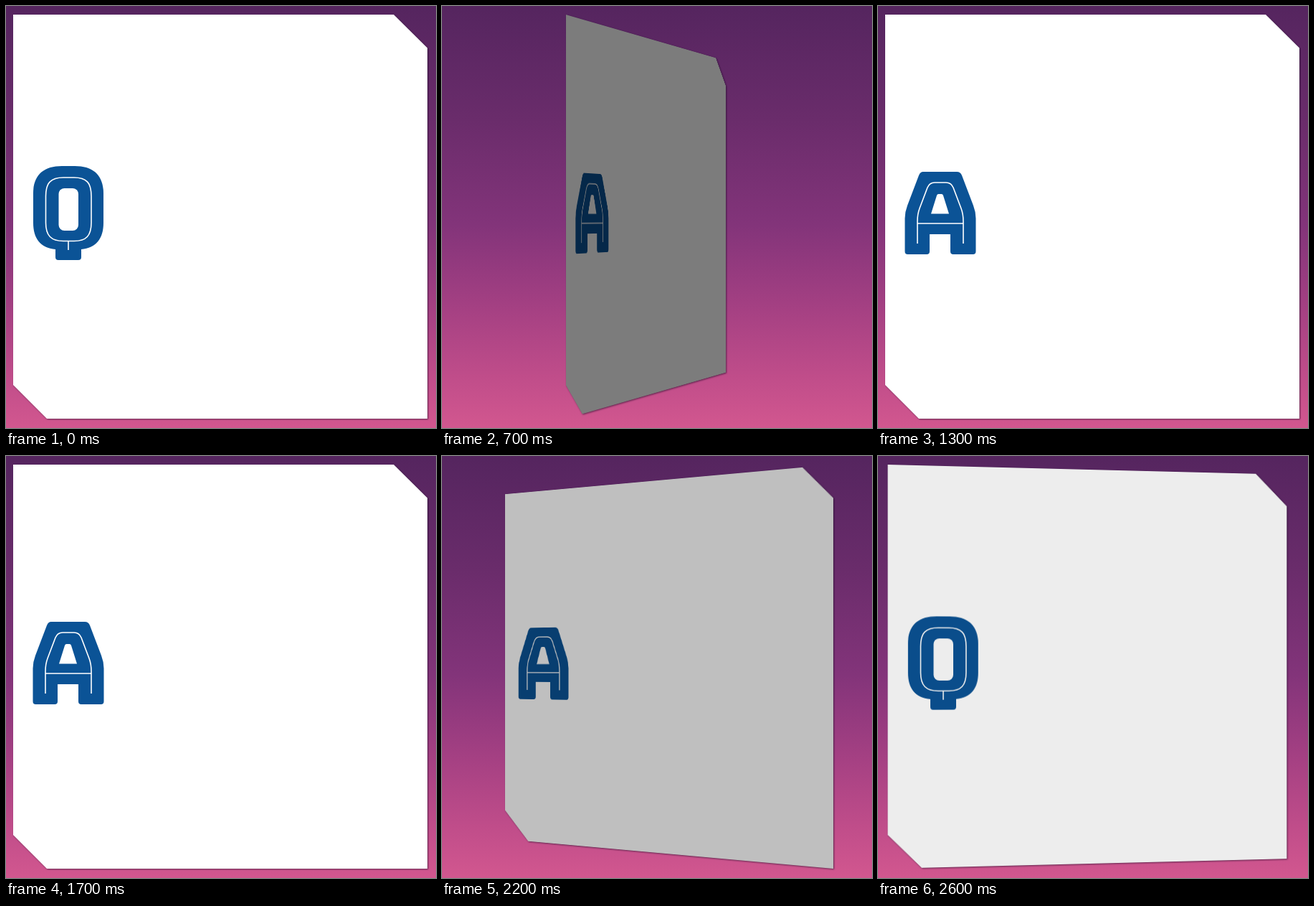
An HTML page for the animation above (2700 ms loop, 600 px wide and 588 px high).

```html
<!DOCTYPE html>
<html lang="en">
<head>
<meta charset="utf-8">
<title>Flipping card</title>
<style>
  html, body { margin: 0; width: 100%; height: 100%; overflow: hidden; }
  body { background: linear-gradient(#55255f, #6a2c6b 27%, #83347a 52%, #a23f82 70%, #c04d8a 88%, #d2578f); }
  #scene {
    width: 600px; height: 588px;
    perspective: 1750px; perspective-origin: 299px 293.5px;
    filter: drop-shadow(1px 1px 1px rgba(25, 8, 35, .6));
  }
  #card { display: block; transform-origin: 299px 293.5px; }
  .paper, .hole { fill: #fff; }
  .body { fill: #0b5396; }
  .line { fill: none; stroke: #fff; stroke-width: 1.6; }
</style>
</head>
<body>
<div id="scene">
  <svg id="card" width="600" height="588" viewBox="0 0 600 588">
    <path class="paper" d="M10 12H541L588 58.5V575H57L10 528Z"/>
    <g id="q">
      <path class="body" d="M38 261C38 236 52 223 78 223H96C122 223 136 236 136 261V302C136 324 126 337 105 339V350q0 4-4 4H73q-4 0-4-4V339C48 337 38 324 38 302Z"/>
      <path class="line" d="M55.5 265C55.5 246 63 239 80 239H95C112 239 119 246 119 265V302C119 320 112 327.5 95 327.5H80C63 327.5 55.5 320 55.5 302ZM87 328V340"/>
      <rect class="hole" x="73.5" y="254" width="27.5" height="59" rx="8"/>
    </g>
    <g id="a">
      <path class="body" d="M63 231H110q5 0 7 5L133 278Q136.5 287 136.5 296V342q0 4-4 4H105q-4 0-4-4V318H72V342q0 4-4 4H41.5q-4 0-4-4V296Q37.5 287 41 278L57 236q2-5 6-5Z"/>
      <path class="line" d="M55 331V300Q55 290 58 282L69 253Q72 246 79 246H95Q102 246 105 253L116 282Q119 290 119 300V331M55 303H119"/>
      <path class="hole" d="M74 289.5L82 264q.5-2 2.5-2H88.5q2 0 2.5 2L99 289.5Z"/>
    </g>
  </svg>
</div>
<script>
  const LOOP = 2700, STEP = 100, FLIP = 742, HALF_WIDTH = 289;
  const [card, q, a] = ['card', 'q', 'a'].map(id => document.getElementById(id));

  // Degrees turned, 0 to 180, for a flip that begins at start
  function turned(time, start) {
    const u = Math.min(1, Math.max(0, (time - start) / FLIP));
    return 90 * (1 - Math.cos(Math.PI * u ** 1.2));
  }

  function draw(now) {
    const time = Math.floor(now % LOOP / STEP) * STEP;
    const firstFlip = time < 1300;
    const angle = turned(time, firstFlip ? 220 : 1948);
    const past = angle >= 90;
    const tilt = past ? 180 - angle : -angle;

    // Push the card back so its nearest edge stays in the screen plane
    const depth = HALF_WIDTH * Math.sin(Math.abs(tilt) * Math.PI / 180);
    card.style.transform = `translateZ(${-depth}px) rotateY(${tilt}deg)`;
    card.style.filter = `brightness(${1 - Math.abs(tilt) * .008})`;

    const showQ = firstFlip !== past;
    q.style.display = showQ ? '' : 'none';
    a.style.display = showQ ? 'none' : '';
    requestAnimationFrame(draw);
  }

  draw(performance.now());
</script>
</body>
</html>
```
